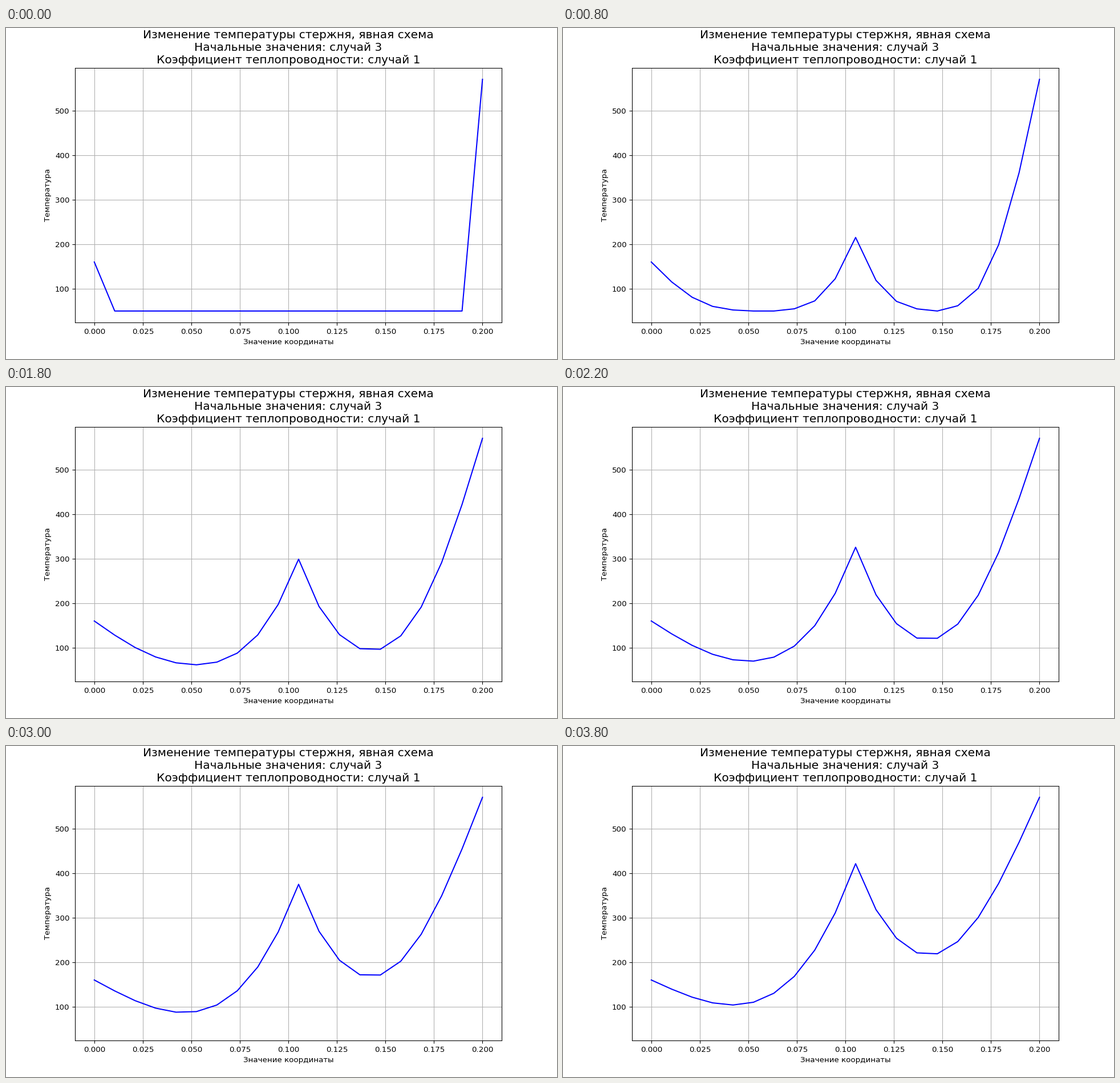
A matplotlib script that plays this animation: 966x580 px, repeating every 4000 ms.

```python
import numpy as np
import matplotlib.pyplot as plt
from matplotlib.animation import FuncAnimation

plt.rcParams["font.family"] = "DejaVu Sans"

NODES, FRAMES = 20, 20
LENGTH = 0.2
T_LEFT, T_START, T_RIGHT = 160, 50, 570
HEATER = 10          # node with the point heat source
HEAT = 90.0          # degrees added to it per step

# Dimensionless conductivity of every link between neighbouring nodes
link = np.where(np.arange(NODES - 1) < HEATER, 0.380, 0.388)
link[HEATER] = 0.355


def solve():
    """Explicit scheme: one temperature profile per time step."""
    temp = np.full(NODES, float(T_START))
    temp[0], temp[-1] = T_LEFT, T_RIGHT
    profiles = [temp]
    for _ in range(FRAMES - 1):
        temp = temp.copy()
        temp[1:-1] += np.diff(link * np.diff(temp))
        temp[HEATER] += HEAT
        profiles.append(temp)
    return profiles


x = np.linspace(0, LENGTH, NODES)
profiles = solve()

# 966 x 580 pixels
fig, ax = plt.subplots(figsize=(10, 6.00415), dpi=96.6)
line, = ax.plot(x, profiles[0], color="blue")
ax.set_title("Изменение температуры стержня, явная схема\n"
             "Начальные значения: случай 3\n"
             "Коэффициент теплопроводности: случай 1", fontsize=15)
ax.set_xlabel("Значение координаты")
ax.set_ylabel("Температура")
ax.set_xlim(-0.01, 0.21)
ax.set_ylim(24, 596)
ax.grid(True)


def draw(step):
    line.set_ydata(profiles[step])
    return line,


anim = FuncAnimation(fig, draw, frames=FRAMES, interval=200,
                     repeat=True, repeat_delay=0)
plt.show()
```
